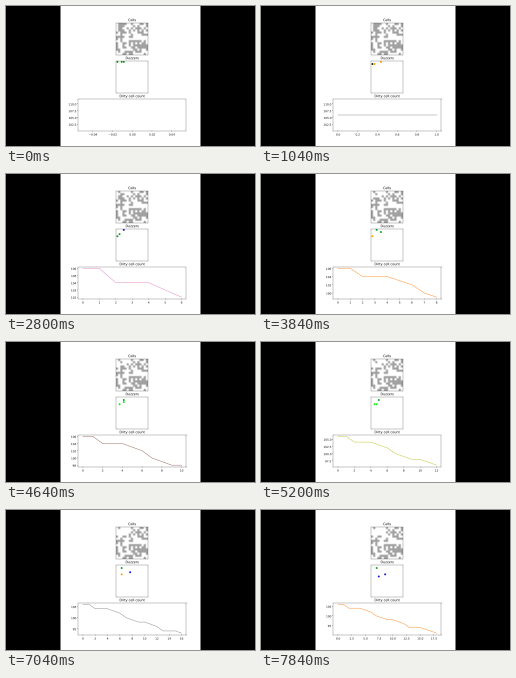
These frames come from a looping animation (249 px wide and 140 px high, 8000 ms). A matplotlib script:

```python
import numpy as np
import matplotlib.pyplot as plt
from matplotlib import patheffects
from matplotlib.animation import FuncAnimation
from matplotlib.patches import Rectangle

STEPS, STEP_MS = 40, 200
SIZE = 15
WIDTH, HEIGHT = 249, 140
GREY = 0.63

# Corners of the falling count as (turn, dirty cells)
BENDS = [(1, 106), (2, 104), (4, 104), (6, 102), (8, 99),
         (10, 98), (12, 96), (13, 94), (15, 94), (18, 91)]

# Evenly timed (column, row) waypoints of each robot
ROUTES = [
    [(0, 0), (0, 3), (1, 3), (3, 5)],
    [(2, 0), (1, 1), (1, 2), (4, 1), (2, 3), (6, 2), (6, 4)],
    [(3, 0), (4, 0), (3, 0), (2, 0), (3, 1), (2, 1), (2, 1)],
]
# One letter per robot, evenly timed
MOODS = "ggg koo ggb ogg llg obg bbg".split()
PALETTE = {"g": "#10a020", "k": "#202020", "o": "orange",
           "b": "#1818e0", "l": "#10f010"}

# A path effect makes text draw as smooth outlines at this tiny size
plt.rcParams.update({"font.family": "DejaVu Sans",
                     "path.effects": [patheffects.Normal()]})


def count_at(turn):
    return np.round(np.interp(turn, *zip(*BENDS)))


def turn_at(step):
    return max(0, step // 2 - 1)


def along(route, step):
    when = np.linspace(0, STEPS - 1, len(route))
    return [round(np.interp(step, when, axis)) for axis in zip(*route)]


def robots(step):
    return [along(route, step) for route in ROUTES]


def make_room(rng):
    """Return the dirty room and the spots the robots clean, in order."""
    visits = [(row, col) for step in range(STEPS) for col, row in robots(step)]
    trail = list(dict.fromkeys(visits))
    first, last = count_at(0), count_at(turn_at(STEPS - 1))
    picks = np.linspace(1, len(trail) - 1, int(first - last)).astype(int)
    spots = [trail[i] for i in picks]

    free = [cell for cell in np.ndindex(SIZE, SIZE) if cell not in trail]
    dirty = [free[i] for i in rng.choice(len(free), int(last), replace=False)]
    room = np.ones((SIZE, SIZE))
    for cell in dirty + spots:
        room[cell] = GREY
    return room, spots


room, spots = make_room(np.random.default_rng(12))

fig = plt.figure(figsize=(WIDTH / 20, HEIGHT / 20), dpi=20, facecolor="black")
left, side = (WIDTH - HEIGHT) / 2 / WIDTH, HEIGHT / WIDTH
fig.add_artist(Rectangle((left, 0), side, 1, color="white", lw=0,
                         zorder=-5, snap=False))
grid = fig.add_gridspec(3, 1, left=left + 0.125 * side,
                        right=left + 0.9 * side,
                        bottom=0.11, top=0.88, hspace=0.2)
cells_ax, robots_ax, count_ax = [fig.add_subplot(g) for g in grid]

for ax, title in ((cells_ax, "Cells"), (robots_ax, "Duzzers")):
    ax.set(title=title, xticks=[], yticks=[])
count_ax.set_title("Dirty cell count")

image = cells_ax.imshow(room, cmap="gray", vmin=0, vmax=1)
robots_ax.set(xlim=(-0.5, SIZE - 0.5), ylim=(SIZE - 0.5, -0.5), aspect="equal")
dots = robots_ax.scatter(*zip(*robots(0)), s=50, linewidths=0)
line, = count_ax.plot([], [])


def update(step):
    turns = np.arange(turn_at(step) + 1)
    counts = count_at(turns)
    line.set_data(turns, counts)
    line.set_color(f"C{(step + 2) % 10}")
    count_ax.relim()
    count_ax.autoscale()

    now = room.copy()
    for spot in spots[:int(counts[0] - counts[-1])]:
        now[spot] = 1
    image.set_data(now)

    dots.set_offsets(robots(step))
    mood = MOODS[round(step / (STEPS - 1) * (len(MOODS) - 1))]
    dots.set_facecolor([PALETTE[m] for m in mood])
    return image, dots, line


anim = FuncAnimation(fig, update, frames=STEPS, interval=STEP_MS,
                     repeat=True, repeat_delay=0, blit=False)
plt.show()
```
